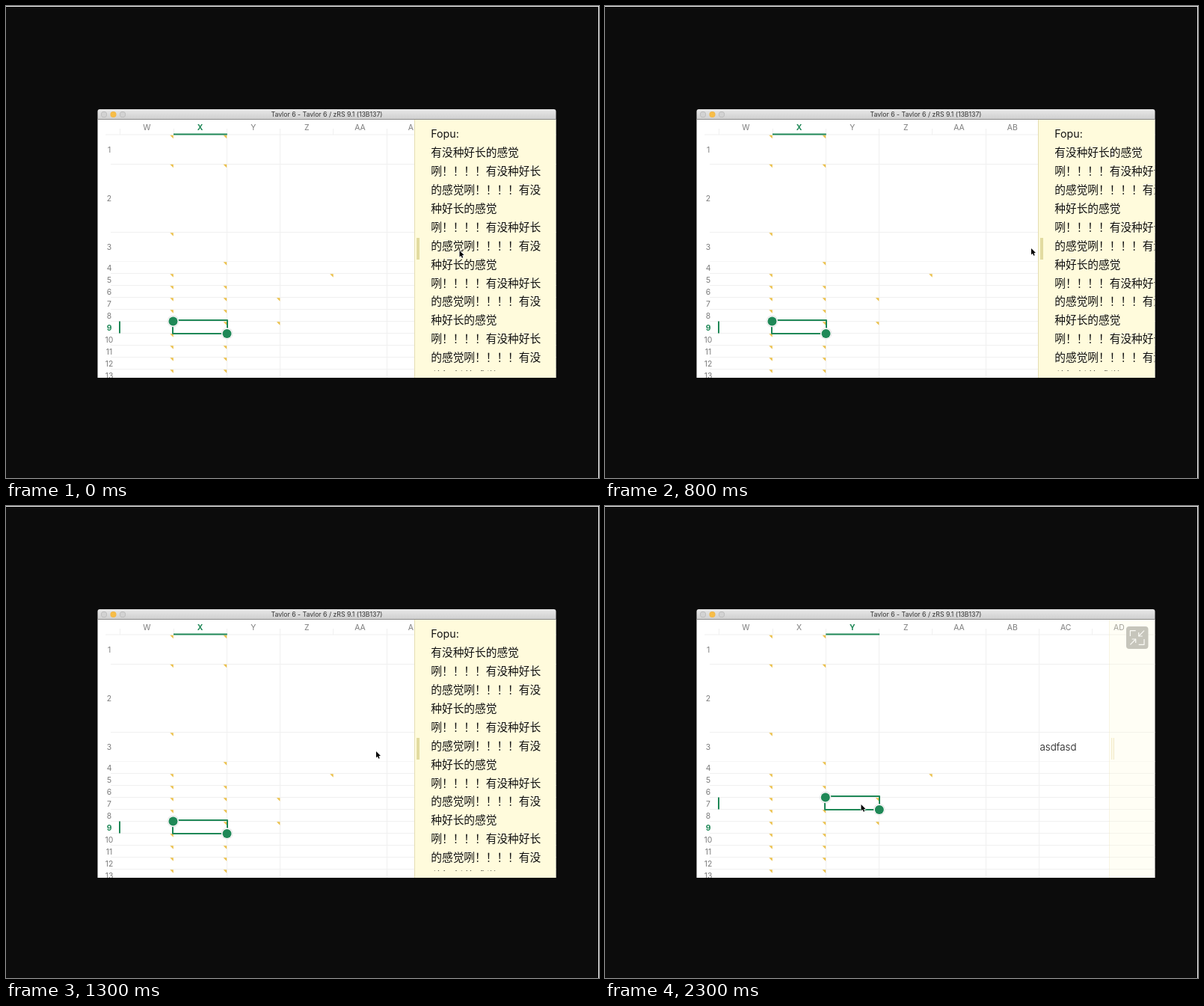
An HTML page with a canvas for the animation above (2400 ms loop, 793 by 631 pixels).

```html
<!DOCTYPE html>
<html lang="zh-CN">
<head>
<meta charset="utf-8">
<style>
html, body { margin: 0; width: 100%; height: 100%; overflow: hidden; background: #0c0c0c; }
canvas { display: block; }
</style>
</head>
<body>
<canvas id="stage" width="793" height="631"></canvas>
<script>
const ctx = document.getElementById('stage').getContext('2d');
const LOOP = 2400, STEP = 100;
const LEFT = 122.5, RIGHT = 735.5, TOP = 138, BODY = 152, BOTTOM = 497;
const GREEN = '#1f8857', GREY = '#7c7c7c', PALE = '#f0f0f0';
const SANS = 'Inter, Roboto, sans-serif';
const NOTE = '"Noto Sans CJK SC", "Noto Sans CJK", Inter, sans-serif';

const cols = ['W', 'X', 'Y', 'Z', 'AA', 'AB', 'AC', 'AD'];
const colX = i => 152.7 + i * 71.3;

// Top of a row: three tall ones, then an even pitch
const rowY = r => r < 4 ? [172, 211, 302.5][r - 1] : 341.5 + (r - 4) * 16;

// Cells with a comment
const hasMark = [r => r !== 4, r => r !== 3 && r !== 5, r => r === 7 || r === 9, r => r === 5];

const verse = ['咧！！！！有没种好长', '的感觉咧！！！！有没', '种好长的感觉'];
const note = ['Fopu:', '有没种好长的感觉', ...verse, ...verse, ...verse, ...verse];

// Each key: time, value(s)
const panelKeys = [[0, 546], [300, 546], [700, 588], [800, 579], [1000, 627], [1300, 546], [1400, 546],
  [1700, 620], [2000, 674]];
const cursorKeys = [[0, 606.5, 327], [300, 550, 325], [500, 569, 324], [800, 570, 324], [1000, 620, 324],
  [1300, 495, 328], [1700, 630, 328], [2300, 342.5, 399]];

function at(keys, t) {
  const n = keys.findIndex(k => k[0] > t);
  if (n < 0) return keys[keys.length - 1].slice(1);
  const a = keys[n - 1], b = keys[n], f = (t - a[0]) / (b[0] - a[0]);
  return a.slice(1).map((v, i) => v + (b[i + 1] - v) * f);
}

function rect(x, y, w, h, color) {
  ctx.fillStyle = color;
  ctx.fillRect(x, y, w, h);
}

function round(x, y, w, h, r, color) {
  ctx.fillStyle = color;
  ctx.beginPath();
  ctx.roundRect(x, y, w, h, r);
  ctx.fill();
}

function text(s, x, y, font, color, align = 'center') {
  ctx.font = font;
  ctx.textAlign = align;
  ctx.fillStyle = color;
  ctx.fillText(s, x, y);
}

function label(s, x, y, on) {
  text(s, x, y, (on ? '700 ' : '') + '10.4px ' + SANS, on ? GREEN : GREY);
}

function disc(x, y, r, color) {
  ctx.fillStyle = color;
  ctx.beginPath();
  ctx.arc(x, y, r, 0, Math.PI * 2);
  ctx.fill();
}

function shape(points, color) {
  ctx.fillStyle = color;
  ctx.beginPath();
  points.forEach(p => ctx.lineTo(...p));
  ctx.closePath();
  ctx.fill();
}

function line(points, color, width) {
  ctx.strokeStyle = color;
  ctx.lineWidth = width;
  ctx.beginPath();
  points.forEach(p => ctx.lineTo(...p));
  ctx.stroke();
}

function clipTo(x, y, w, h, draw) {
  ctx.save();
  ctx.beginPath();
  ctx.rect(x, y, w, h);
  ctx.clip();
  draw();
  ctx.restore();
}

function drawWindow() {
  rect(0, 0, 793, 631, '#0c0c0c');
  rect(0, 0, 793, 1, '#f4f4f4');
  rect(792, 0, 1, 631, '#f4f4f4');

  const bar = ctx.createLinearGradient(0, TOP, 0, BODY);
  bar.addColorStop(0, '#e8e8e8');
  bar.addColorStop(1, '#cecece');
  round(LEFT, TOP, RIGHT - LEFT, BODY - TOP, [3, 3, 0, 0], bar);
  rect(LEFT, BODY - 1, RIGHT - LEFT, 1, '#8c8c8c');
  for (let i = 0; i < 3; i++) {
    const x = 131 + i * 12.5;
    disc(x, 145, 4, i === 1 ? '#efb544' : '#b8b8b8');
    disc(x, 145, 3.3, i === 1 ? '#f7bd48' : '#d2d2d2');
  }
  text('Tavlor 6 - Tavlor 6 / zRS 9.1 (13B137)', 429, 148, '8.7px ' + SANS, '#333');
  rect(LEFT, BODY, RIGHT - LEFT, BOTTOM - BODY, '#fff');
}

function drawSheet(sel) {
  rect(133, 171.5, RIGHT - 133, 1, PALE);
  for (let r = 2; r <= 13; r++) rect(140, Math.floor(rowY(r)), RIGHT - 140, 1, r === 4 ? '#f6f6f6' : PALE);
  cols.forEach((c, i) => {
    const x = Math.floor(colX(i));
    rect(x, 164, 1, 8, PALE);
    if (i > 1 && i < 7 && i !== 4) rect(x, 172, 1, BOTTOM - 172, PALE);
    label(c, colX(i) + 35.6, 166.4, i === sel.col);
  });
  for (let r = 1; r <= 13; r++) {
    label(r, 138, (rowY(r) + rowY(r + 1)) / 2 + 4.3, r === 9);
    hasMark.forEach((test, c) => {
      if (!test(r)) return;
      const x = colX(c + 1) - 0.2, y = rowY(r) + 0.8;
      shape([[x - 4.5, y], [x, y], [x, y + 4.5]], '#ebc04a');
    });
  }
  text('asdfasd', 581.5, 327.3, '300 13.4px ' + SANS, '#111', 'left');

  const x0 = colX(sel.col), x1 = colX(sel.col + 1);
  const y0 = rowY(sel.row), y1 = rowY(sel.row + 1);
  rect(x0, 170.5, x1 - x0 + 0.5, 2, GREEN);
  rect(151, y0, 2, y1 - y0, GREEN);
  ctx.strokeStyle = GREEN;
  ctx.lineWidth = 2;
  ctx.strokeRect(Math.round(x0) - 1, y0 - 1.5, Math.round(x1 - x0) + 2, y1 - y0 + 2);
  for (const [x, y] of [[x0 - 0.5, y0], [x1 + 0.2, y1 + 0.4]]) {
    disc(x, y, 7.7, '#d9d9d9');
    disc(x, y, 7.1, '#fff');
    disc(x, y, 6, GREEN);
  }
}

// A corner and an inward arrow, drawn again half a turn round
function drawIcon(alpha) {
  ctx.save();
  ctx.globalAlpha = alpha;
  ctx.translate(711.7, 176);
  round(-14.7, -15, 29.5, 30, 4, '#c6c5bb');
  for (let i = 0; i < 2; i++) {
    line([[-2, -9.3], [-9.3, -9.3], [-9.3, -2]], '#fafaf5', 1.2);
    line([[9.3, -9.3], [2, -2]], '#fafaf5', 1.2);
    line([[2, -7], [2, -2], [7, -2]], '#fafaf5', 1.2);
    ctx.rotate(Math.PI);
  }
  ctx.restore();
}

function drawPanel(x, fade, held) {
  ctx.save();
  ctx.globalAlpha = 1 - fade * 0.72;
  rect(x, BODY, RIGHT - x, BOTTOM - BODY, '#fffbdc');
  rect(x, BODY, 1, BOTTOM - BODY, '#e4deb2');
  rect(x + 3, 310, 4, 29, held ? '#f7ecc0' : '#e2dba0');
  if (held) for (const dx of [3, 6]) rect(x + dx, 310, 1, 29, '#dcc585');
  ctx.globalAlpha = 1 - fade;
  clipTo(x, BODY, RIGHT - x, 336, () => note.forEach((s, i) => {
    const font = i ? '14.7px ' + NOTE : '14.2px ' + SANS;
    text(s, x + 22.3, 176.3 + i * 24.9, font, '#111', 'left');
  }));
  ctx.restore();
  if (fade) drawIcon(fade);
}

function drawCursor(x, y) {
  const arrow = [[0, 0], [0, 8.4], [1.9, 6.7], [3.3, 9.8], [4.7, 9.2], [3.4, 6.2], [6, 6]]
    .map(p => [x + p[0], y + p[1]]);
  line([...arrow, arrow[0]], '#fff', 1.4);
  shape(arrow, '#000');
}

function draw(t) {
  const [panel] = at(panelKeys, t), [cx, cy] = at(cursorKeys, t);
  const fade = Math.min(1, Math.max(0, (t - 1800) / 200));
  const held = Math.abs(cx - panel) < 8 || fade === 1;
  drawWindow();
  clipTo(LEFT, BODY, RIGHT - LEFT, BOTTOM - BODY, () => {
    drawSheet(t < 2300 ? { col: 1, row: 9 } : { col: 2, row: 7 });
    drawPanel(Math.round(panel), fade, held);
  });
  drawCursor(cx, cy);
}

ctx.lineJoin = 'round';
const start = performance.now();
function tick() {
  const t = (performance.now() - start) % LOOP;
  draw(Math.floor(t / STEP) * STEP);
  requestAnimationFrame(tick);
}
tick();
</script>
</body>
</html>
```
